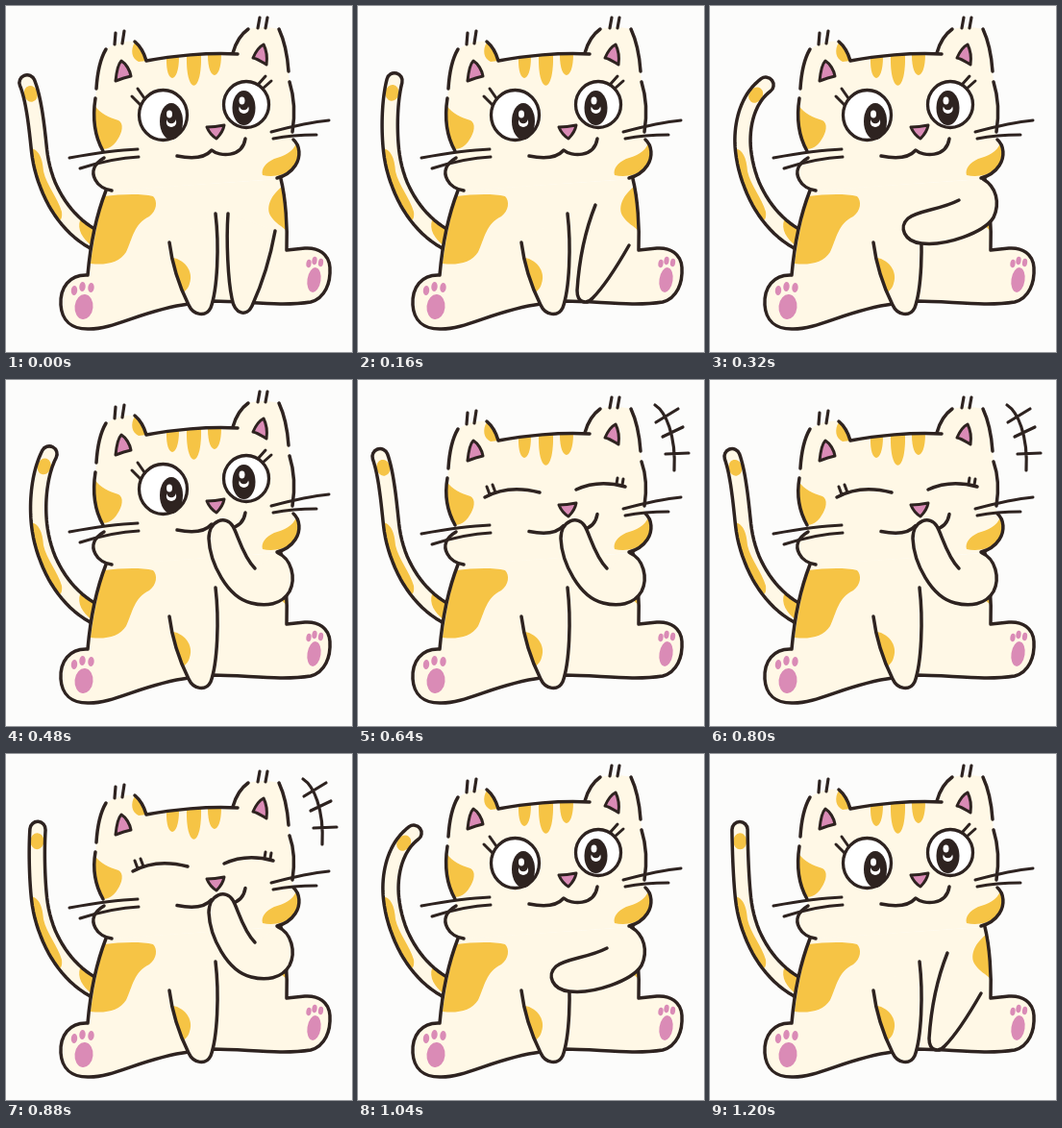
Animation of 360 by 360 pixels, one loop 1280 ms. Source, as an HTML page with a canvas:

```html
<!DOCTYPE html>
<html lang="en">
<head>
<meta charset="utf-8">
<title>Giggling cat</title>
<style>
html, body { margin: 0; width: 100%; height: 100%; overflow: hidden; background: #fcfcfb; }
canvas { display: block; width: 360px; height: 360px; }
</style>
</head>
<body>
<canvas id="stage"></canvas>
<script>
const INK = '#2e2320', CREAM = '#fff8e6', GOLD = '#f6c445', PINK = '#da8bb6', PAPER = '#fcfcfb';
const STEP = 80, STEPS = 16;

const canvas = document.getElementById('stage');
const ctx = canvas.getContext('2d');
const ratio = window.devicePixelRatio || 1;
canvas.width = canvas.height = 360 * ratio;

const fill = (d, color) => { ctx.fillStyle = color; ctx.fill(new Path2D(d)); };
function line(d, width = 3.5) {
  ctx.strokeStyle = INK;
  ctx.lineWidth = width;
  ctx.stroke(new Path2D(d));
}
function shape(d, color, width) { fill(d, color); line(d, width); }
function oval(x, y, rx, ry, color, turn = 0) {
  ctx.fillStyle = color;
  ctx.beginPath();
  ctx.ellipse(x, y, rx, ry, turn, 0, 7);
  ctx.fill();
}
function shifted(dy, draw) {
  ctx.save();
  ctx.translate(0, dy);
  draw();
  ctx.restore();
}

// Horizontal place of the tail tip and the arm pose at each step
const tipX = [22, 25, 38, 52, 58, 55, 45, 31, 23, 11, 23, 33, 48, 58, 47, 31];
const armOrder = [0, 1, 2, 3, 4, 5, 6, 6, 6, 6, 6, 6, 5, 4, 3, 2];
const arms = [
  'M231 216C229 245 231 285 235 304C238 322 251 323 256 312C266 290 275 262 280 234',
  'M237 212C232 240 229 280 231 300C234 316 245 316 251 307C262 290 273 264 281 241',
  'M247 207C237 232 230 265 228 296C228 309 238 311 244 304C258 290 270 270 282 249',
  'M286 182C296 195 297 215 290 232C275 262 245 285 228 284C212 282 210 266 221 256C236 243 248 225 254 207',
  'M284 180C298 188 302 205 295 220C285 236 245 250 220 247C202 245 196 230 206 221C215 213 240 212 259 202',
  'M284 180C298 188 302 206 295 220C285 236 262 242 243 238C222 230 207 212 203 196C200 180 217 174 227 184C236 194 246 200 259 201',
  'M283 180C297 186 302 206 295 220C287 234 270 236 255 232C230 226 212 190 211 165C211 146 229 140 236 152C241 160 246 183 259 196'
];

function bezier(p, t) {
  const u = 1 - t;
  const at = k => u * u * u * p[0][k] + 3 * u * u * t * p[1][k] + 3 * u * t * t * p[2][k] + t * t * t * p[3][k];
  const slope = k => u * u * (p[1][k] - p[0][k]) + 2 * u * t * (p[2][k] - p[1][k]) + t * t * (p[3][k] - p[2][k]);
  return { x: at(0), y: at(1), a: Math.atan2(slope(1), slope(0)) };
}

function drawTail(x) {
  const y = x > 45 ? 77 + (x - 45) * 0.4 : 77 + (45 - x) * 0.12;
  const lower = [[96, 245], [63, 230], [39, 192], [34.5, 150]];
  const upper = [[34.5, 150], [32, 126], [29 + (x - 22) * 0.25, 97], [x, y]];
  const spine = [];
  for (let i = 0; i <= 40; i++) {
    const p = i < 20 ? bezier(lower, i / 20) : bezier(upper, (i - 20) / 20);
    p.w = 8.1 + 2 * Math.max(0, 1 - i / 14);
    spine.push(p);
  }
  const tip = spine[40], tail = new Path2D();
  for (const p of spine) tail.lineTo(p.x + p.w * Math.sin(p.a), p.y - p.w * Math.cos(p.a));
  tail.arc(tip.x, tip.y, tip.w, tip.a - Math.PI / 2, tip.a + Math.PI / 2);
  for (const p of spine.reverse()) tail.lineTo(p.x - p.w * Math.sin(p.a), p.y + p.w * Math.cos(p.a));

  ctx.fillStyle = CREAM;
  ctx.fill(tail);
  ctx.save();
  ctx.clip(tail);
  const spot = bezier(upper, 0.8);
  oval(spot.x, spot.y, 8.5, 7, GOLD, spot.a);
  fill('M24 148C34 148 38 158 39 172C42 186 54 200 58 214C59 222 56 226 52 220C42 206 30 190 24 148Z', GOLD);
  fill('M77 223C74 232 79 242 90 250L98 240L94 228Z', GOLD);
  ctx.restore();
  ctx.strokeStyle = INK;
  ctx.lineWidth = 3.5;
  ctx.stroke(tail);
}

function drawPaw(x, y, rx, turn, toes, toeW, toeH) {
  oval(x, y, rx, 13, PINK, turn);
  for (const [tx, ty] of toes) oval(tx, ty, toeW, toeH, PINK, turn);
}

function drawBody() {
  const body = 'M104 192C95 215 88 245 85 280C66 279 56 293 57 311C58 327 68 336 85 336C112 337 143 316 190 310L215 307C250 307 285 313 317 308C332 304 338 288 337 272C336 258 325 251 311 252L292 254C293 230 291 200 286 180';
  fill(body, CREAM);
  fill('M102 198C118 196 140 195 153 198C158 203 157 213 149 219C133 227 132 241 125 256C118 267 104 270 88 268C91 245 96 220 102 198Z', GOLD);
  fill('M287 188C277 196 270 208 275 218C280 226 287 229 292 234C292 218 290 202 287 188Z', GOLD);
  line(body);
  drawPaw(81, 313, 9.5, 0.1, [[71, 296], [79.5, 292], [88.5, 293]], 3.2, 5);
  drawPaw(320.5, 285, 7, 0.15, [[315, 268], [321, 265], [327.5, 267]], 2.6, 4.2);
}

function drawEye(x, y, rx, ry, px, py, pw, ph) {
  oval(x, y, rx, ry, '#fff');
  ctx.strokeStyle = INK;
  ctx.lineWidth = 3.3;
  ctx.stroke();
  oval(px, py, pw, ph, INK);
  oval(px, py + 1, 5.2, 5, '#fff');
  oval(px, py - 2, 4.6, 4.2, INK);
  oval(px - 2, py - 7.5, 3, 4, '#fff');
}

function drawCrown() {
  fill('M104 45C98 55 95 70 94 86L93 102H299L295 79L294 68C293 53 290 37 284 24Q268 20 252 24C245 29 239 38 236 49C208 49 175 52 146 57C144 50 140 42 134 37Q118 35 104 45Z', CREAM);
  fill('M134 38C129 46 131 55 138 58L146 57C144 50 140 42 134 38Z', GOLD);
  fill('M167 54C166 82 180 82 180 53Z', GOLD);
  fill('M188 52C187 93 204 93 203 51Z', GOLD);
  fill('M210 51C210 79 224 79 224 50Z', GOLD);
  line('M104 45C98 55 95 70 94 86M134 37C140 42 144 50 146 57C172 52 210 48 241 50M236 49C239 38 245 29 252 24M284 24C290 37 293 53 294 68');
  line('M113 40L114 28M121 39L123 26M262 23L264 12M270 23L272 12', 3.2);
  shape('M114 78C115 68 117 60 120 57C125 60 129 67 130 73C125 74 119 76 114 78Z', PINK, 3);
  shape('M257 54C260 47 264 42 268 40C271 46 272 54 271 61C266 58 262 55 257 54Z', PINK, 3);
}

function drawHead(laugh) {
  const dip = laugh ? 6 : 0, mid = laugh ? 4 : 0;
  const left = `M93 ${96 + dip}C90 ${115 + mid} 92 135 101 151`;
  fill(`${left}L102 158C92 164 88 172 93 181C96 187 103 191 110 192L282 180C300 174 312 155 298 139V130C301 112 300 100 297 ${90 + dip}Z`, CREAM);
  shifted(dip, drawCrown);
  shifted(mid / 2, () => fill('M92 103C98 112 107 116 117 119C123 122 121 132 116 139C112 146 106 149 100 149C93 135 91 118 92 103Z', GOLD));
  fill('M302 143C307 150 305 163 297 170C289 177 276 178 267 176C265 170 270 163 279 159C290 156 298 152 302 143Z', GOLD);
  line(`${left}M102 158C92 164 88 172 93 181C96 187 103 191 110 192`);
  line(`M295 ${79 + dip}C300 ${95 + mid} 301 112 298 131M299 139C306 145 307 157 301 166C297 172 290 177 282 179`);

  if (laugh) {
    line('M132 122C150 112 170 112 189 117M227 114C242 107 260 106 278 111');
    line('M137 119L134 111M143 117L140 109M269 108L270 102M275 109L276 103', 3);
  } else {
    drawEye(163.5, 113.5, 25, 26, 172, 120, 12, 19);
    drawEye(250, 102.5, 23.5, 24, 247.5, 106, 12, 18);
    line('M131 94L140 103M137 86L144 96M262 82L270 73M267 86L276 78', 3);
  }

  shifted(mid, () => shape('M209 126C215 126 222 125 227 124C226 130 222 135 219 138C214 135 211 131 209 126Z', PINK, 3));
  shifted(laugh ? 1.5 : 0, () => line('M178 156C192 159 206 159 214 150C222 157 246 158 249 138'));
  shifted(laugh ? 2 : 0, () => line('M66 158C88 154 112 150 137 149M77 169C96 163 116 158 138 157', 3));
  shifted(laugh ? 3 : 0, () => line('M276 131C295 126 315 121 336 119M278 138C293 135 308 134 323 134', 3));
}

function drawLeftArm() {
  const arm = 'M170 246C173 270 182 295 190 311C195 322 208 324 213 314C220 295 222 250 218 216';
  fill(arm, CREAM);
  fill('M174 262C185 264 193 274 192 284C191 292 188 296 184 298C179 287 176 275 174 262Z', GOLD);
  line(arm);
}

function draw(step) {
  const laugh = step >= 8 && step < 12;
  ctx.setTransform(ratio, 0, 0, ratio, 0, 0);
  ctx.fillStyle = PAPER;
  ctx.fillRect(0, 0, 360, 360);
  ctx.lineCap = ctx.lineJoin = 'round';
  drawTail(tipX[step]);
  drawBody();
  drawHead(laugh);
  drawLeftArm();
  shape(arms[armOrder[step]], CREAM);
  if (laugh) line('M309 26C320 33 331 57 329 94M310 44L333 30M317 59L338 49M320 77L344 76', 3.2);
}

const start = performance.now();
function tick() {
  draw(Math.floor((performance.now() - start) / STEP) % STEPS);
  requestAnimationFrame(tick);
}
tick();
</script>
</body>
</html>
```
